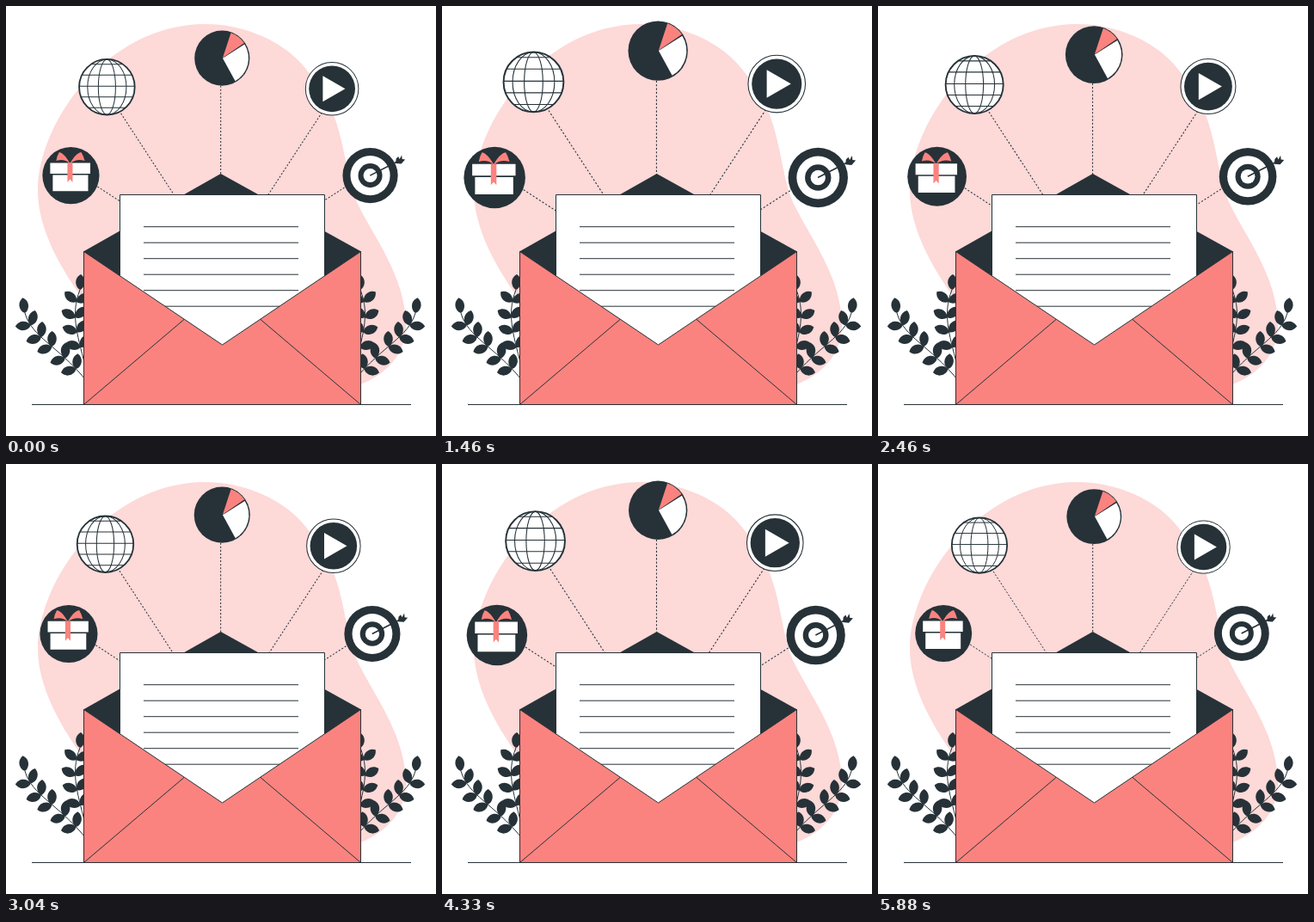
An HTML page for the animation above (5930 ms loop, 500 by 500 pixels).

```html
<!DOCTYPE html>
<html lang="en">
<head>
<meta charset="utf-8">
<title>Open envelope</title>
<style>
  html, body { margin: 0; width: 100%; height: 100%; overflow: hidden; background: #fff; }
  svg { display: block; width: 100vw; height: 100vh; }
  .d { fill: #263238; }
  .w { fill: #fff; }
  .c { fill: #fb837f; }
  .o { stroke: #263238; stroke-width: 1; }
  .l { fill: none; stroke: #263238; stroke-width: 1; }
</style>
</head>
<body>
<svg viewBox="0 0 500 500">
  <defs>
    <path id="leaf" class="d" d="M0 0C-6 -3 -8 -13 0 -18C8 -13 6 -3 0 0Z"/>
    <g id="plant"></g>
  </defs>

  <path fill="#fdd9d8" d="M232 21C272 21 325 38 354 80C396 130 390 185 408 228C428 270 465 315 465 372C465 405 440 430 412 440L92 344C68 312 37 262 37 215C37 135 118 21 232 21Z"/>
  <use href="#plant"/>
  <use href="#plant" transform="matrix(-1 0 0 1 498 0)"/>

  <g id="icons">
    <path class="l" stroke-dasharray="2 2" d="M107 210L250 303M134 125L250 303M249.700 93V303M367 124L250 303M393 211L250 303"/>

    <!-- gift -->
    <circle class="d" cx="76" cy="197" r="33"/>
    <path class="w" d="M52 182.500H98.500V195H52ZM55 196.500H96V215H55Z"/>
    <path class="c" d="M72 182.500H78V205L75 201.500L72 205ZM75 183C71 176 67 171 62.500 170Q60 174 59 180Q68 177 75 183ZM75 183C79 176 83 171 88 170Q90.500 174 92 180Q83 177 75 183Z"/>

    <!-- globe -->
    <g id="globe" transform="translate(117.800 94.500)">
      <circle class="w" r="32.200" stroke="#263238" stroke-width="1.800"/>
      <ellipse class="l" rx="22.500" ry="32"/>
      <ellipse class="l" rx="10" ry="32"/>
    </g>

    <!-- pie -->
    <circle class="d" cx="251.300" cy="61" r="32"/>
    <path class="c" d="M252 60.500L261.500 31.700Q271 35 276.900 43.400Z"/>
    <path class="w" d="M252 61L277.300 45A30.400 30.400 0 0 1 266.500 87.500Z"/>

    <!-- play -->
    <circle class="w o" cx="378.700" cy="96.500" r="30.700"/>
    <circle class="d" cx="378.700" cy="96.500" r="26.800"/>
    <path class="w" d="M368 81.500V111.500L394 96.500Z"/>

    <!-- dartboard -->
    <g id="board"></g>
    <path class="l" style="stroke-width:1.500" d="M422.800 197L456 180"/>
    <path class="d" d="M452.500 183L453 177.500L455.500 175L457 178L459.500 173.500L460 178L463.500 178.500L459 183.500Z"/>
  </g>

  <path class="d" d="M90 285.500L249.700 195L413 285.500V340H90Z"/>
  <path class="w o" d="M132.500 219.500H370.500V420H132.500Z"/>
  <path class="l" id="text"/>
  <path class="c o" d="M90.500 285.500L251.500 394L412.500 285.500V463.500H90.500Z"/>
  <path class="l" d="M90.500 463.500L207 364.500M412.500 463.500L296 364.500M30 463.500H471"/>
</svg>
<script>
const $ = id => document.getElementById(id);
const add = (id, markup) => $(id).insertAdjacentHTML('beforeend', markup);

const bezier = (p, t) => {
  const u = 1 - t;
  return [0, 1].map(i => u * u * u * p[i] + 3 * u * u * t * p[i + 2] + 3 * u * t * t * p[i + 4] + t * t * t * p[i + 6]);
};
const leaf = ([x, y], angle) => add('plant', `<use href="#leaf" transform="translate(${x} ${y}) rotate(${angle})"/>`);

// A stem with a leaf at the tip and pairs of leaves along it.
function branch(p, spots, tip) {
  add('plant', `<path class="l" d="M${p.slice(0, 2)}C${p.slice(2)}"/>`);
  leaf(p.slice(6), tip);
  for (const t of spots) {
    const a = bezier(p, t), b = bezier(p, t + 0.01);
    const dir = Math.atan2(b[0] - a[0], a[1] - b[1]) * 180 / Math.PI;
    leaf(a, dir - 60);
    leaf(a, dir + 50);
  }
}
branch([92, 434, 60, 395, 30, 385, 22, 357], [0.11, 0.25, 0.43, 0.6, 0.81], -8);
branch([94, 426, 84, 385, 74, 360, 86, 330], [0.26, 0.44, 0.63, 0.84], 3);

for (const y of [-26.5, -14, -1, 11.5, 24]) {
  const half = Math.sqrt(32 ** 2 - y ** 2);
  add('globe', `<path class="l" d="M${-half} ${y}h${2 * half}"/>`);
}
[32, 23, 14, 8].forEach((r, i) =>
  add('board', `<circle class="${i % 2 ? 'w' : 'd'}" cx="423" cy="197" r="${r}"/>`));
$('text').setAttribute('d', [0, 1, 2, 3, 4, 5].map(i => `M160 ${256.7 + i * 18.5}H340`).join(''));

// Two linear pulses per loop: the first one falls at half speed.
const LOOP = 5930, PHASE = 60;
function pulse(t) {
  const f = (t + PHASE) % LOOP / LOOP * 5;
  if (f < 1) return f;
  if (f < 3) return (3 - f) / 2;
  return f < 4 ? f - 3 : 5 - f;
}
const start = performance.now();
function draw() {
  const s = 0.998 + 0.1 * pulse(performance.now() - start);
  $('icons').setAttribute('transform', `translate(253 167) scale(${s}) translate(-253 -167)`);
  requestAnimationFrame(draw);
}
draw();
</script>
</body>
</html>
```
